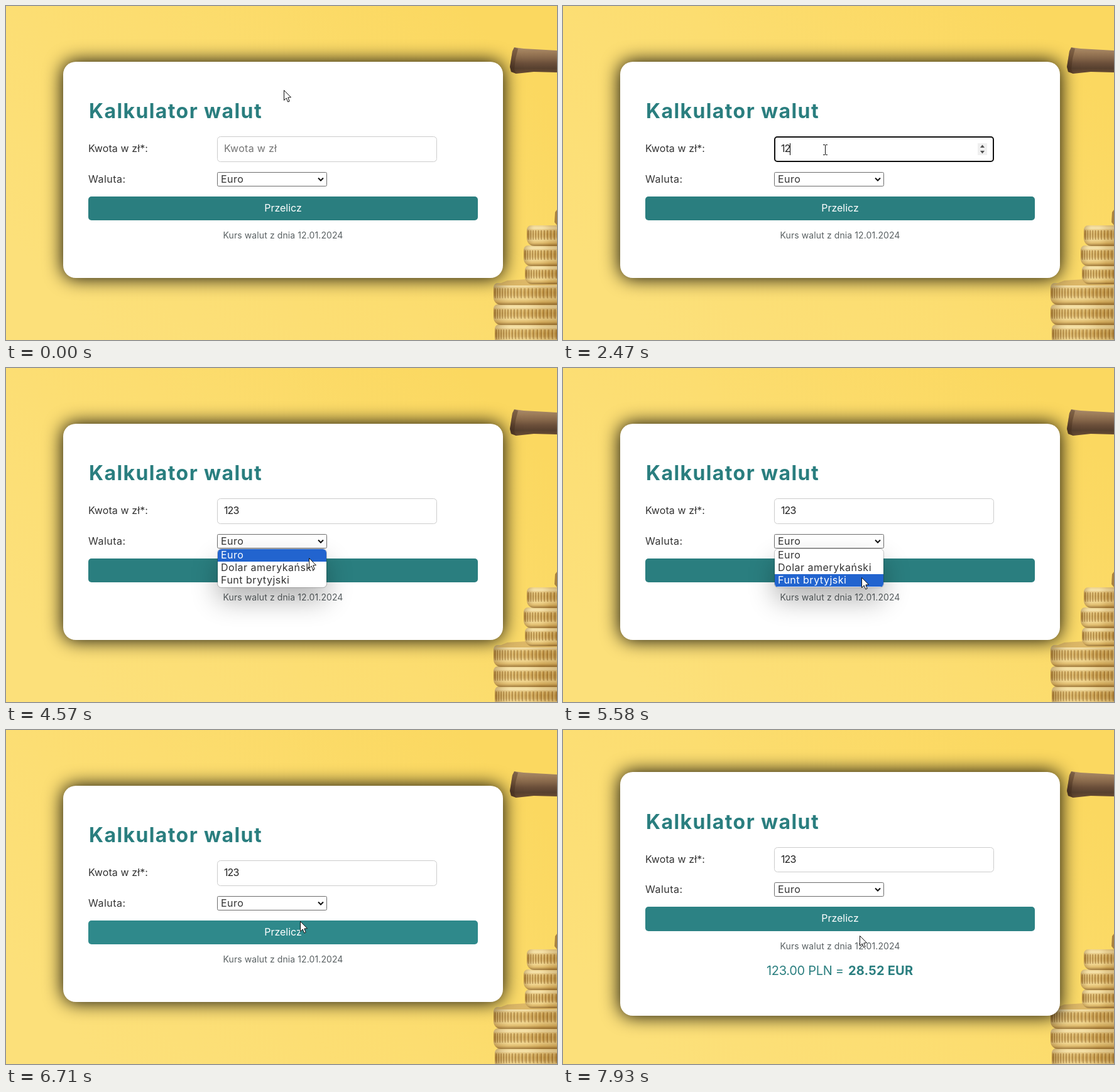
Recreate the animation shown at these times as an HTML page with a canvas. Size 877 px wide and 533 px high, loop 8000 ms.

```html
<!DOCTYPE html>
<html lang="pl">
<head>
<meta charset="utf-8">
<title>Kalkulator walut</title>
<style>
  html, body { margin: 0; width: 100%; height: 100%; overflow: hidden; background: #fcdc6c; }
  canvas { display: block; }
</style>
</head>
<body>
<canvas id="stage" width="877" height="533"></canvas>
<script>
const W = 877, H = 533, LOOP = 8000;
const TEAL = [42, 126, 127], TEAL_HOVER = [60, 162, 165];
const OPTIONS = ["Euro", "Dolar amerykański", "Funt brytyjski"];
const ctx = document.getElementById("stage").getContext("2d");

const rgb = c => `rgb(${c.map(Math.round)})`;
const mix = (a, b, f) => a.map((v, i) => v + (b[i] - v) * f);
const clamp = v => Math.max(0, Math.min(1, v));
const smooth = f => f * f * (3 - 2 * f);
const within = (t, a, b) => t >= a && t < b;

// Pointer moves: start, end, number of steps, target x, target y
const MOVES = [
  [70, 400, 6, 417, 229],
  [2670, 2670, 1, 416, 229],
  [3270, 3680, 7, 498, 276],
  [3750, 3820, 2, 499, 273],
  [4230, 4570, 6, 482, 303],
  [5240, 5640, 7, 475, 336],
  [5840, 6240, 7, 468, 303],
  [6650, 6990, 6, 472, 328]
];
const CLICKS = [[540, 600], [3820, 3960], [6510, 6650], [7650, 7790]];
const KEYS = [2200, 2470, 2940];
const OPEN = 3890, CLOSE = 6580, RESULT = 7790;

function pointerAt(t) {
  let x = 442, y = 134;
  for (const [start, end, n, tx, ty] of MOVES) {
    if (t < start) break;
    const step = n > 1 ? (end - start) / (n - 1) : 1;
    const k = Math.min(n, Math.floor((t - start) / step + 0.01) + 1);
    const f = smooth(k / n);
    x += (tx - x) * f;
    y += (ty - y) * f;
  }
  return { x: Math.round(x), y: Math.round(y) };
}

function caretOn(t) {
  const last = KEYS.filter(k => t >= k).pop();
  if (last) return (t - last) % 1000 < 500;
  return within(t, 540, 1070) || within(t, 1540, 2070);
}

function text(c, s, x, y, font, color, gap = 0, align = "left") {
  c.font = font + " Inter, 'Open Sans', sans-serif";
  c.letterSpacing = gap + "px";
  c.textAlign = align;
  c.fillStyle = color;
  c.fillText(s, x, y);
}

function box(c, x, y, w, h, r, fill, stroke, line = 1) {
  c.beginPath();
  c.roundRect(x, y, w, h, r);
  if (fill) { c.fillStyle = fill; c.fill(); }
  if (stroke) { c.strokeStyle = stroke; c.lineWidth = line; c.stroke(); }
}

function poly(c, pts, fill) {
  c.beginPath();
  pts.forEach(([x, y]) => c.lineTo(x, y));
  c.closePath();
  c.fillStyle = fill;
  c.fill();
}

function gradient(c, x0, y0, x1, y1, colors) {
  const g = c.createLinearGradient(x0, y0, x1, y1);
  colors.forEach((col, i) => g.addColorStop(i / (colors.length - 1), col));
  return g;
}

// One flat coin seen from the side, running off the right edge
function coin(c, x, y, h) {
  c.save();
  box(c, x, y, W - x + 40, h, [7, 0, 0, 12]);
  c.clip();
  c.fillStyle = gradient(c, 0, y, 0, y + h,
    ["#e9cd88", "#f6e3ab", "#d2a959", "#c69a48", "#cda355", "#f0d48c", "#dcb563", "#8f6628"]);
  c.fillRect(x, y, W - x, h);

  // Milled edge, denser where the rim curves away
  for (let px = x + 2, i = 0; px < W; i++) {
    c.fillStyle = "rgba(125,84,28,.5)";
    c.fillRect(px, y + h * 0.24, 1.6, h * 0.46);
    c.fillStyle = "rgba(250,228,165,.55)";
    c.fillRect(px + 1.8, y + h * 0.22, 1.4, h * 0.46);
    px += 3.6 + Math.min(2.4, i * 0.25);
  }

  // Shaded left side, a bright band, then softer light
  c.fillStyle = gradient(c, x, 0, W, 0,
    ["rgba(120,78,20,.35)", "rgba(255,240,190,.15)", "rgba(255,240,190,.1)", "rgba(150,105,40,.15)", "rgba(130,88,30,.25)"]);
  c.fillRect(x, y, W - x, h);
  c.restore();
}

function makeBackdrop() {
  const cv = document.createElement("canvas");
  cv.width = W;
  cv.height = H;
  const c = cv.getContext("2d");
  c.fillStyle = gradient(c, 150, H, 730, 0, ["#fce07a", "#fcdd70", "#fbd860"]);
  c.fillRect(0, 0, W, H);

  // Wooden handle
  const wood = gradient(c, 0, 66, 0, 108, ["#a98b6b", "#9c7b58", "#86674a", "#6b4f3a", "#57402f", "#6a4d34"]);
  poly(c, [[809, 66], [824, 68], [W, 71], [W, 106], [840, 105], [812, 108], [804, 105], [802, 97], [806, 72]], wood);
  poly(c, [[809, 66], [815, 68], [811, 84], [809, 101], [812, 108], [804, 105], [802, 97], [806, 72]], "rgba(70,45,28,.4)");

  // Coin stacks, lowest first
  coin(c, 778, 508, 34);
  coin(c, 776, 476, 33);
  coin(c, 776, 442, 35);
  poly(c, [[778, 446], [798, 438], [830, 436], [W, 436], [W, 446]], "#dcb767");
  coin(c, 826, 414, 30);
  coin(c, 824, 382, 33);
  coin(c, 829, 350, 33);
  poly(c, [[W, 325], [874, 329], [873, 345], [W, 350]], "#a9823f");
  return cv;
}
const backdrop = makeBackdrop();

function drawCard(y, h) {
  ctx.save();
  ctx.shadowColor = "#000";
  ctx.shadowBlur = 30;
  box(ctx, 91, y, 700, h, 20, "#fff");
  ctx.restore();
}

function drawSpinner(y) {
  ctx.fillStyle = "#efefef";
  ctx.fillRect(660, y + 11, 15, 19);
  poly(ctx, [[664, y + 18], [667.5, y + 13.5], [671, y + 18]], "#505050");
  poly(ctx, [[664, y + 23], [667.5, y + 27.5], [671, y + 23]], "#505050");
}

function drawInput(t, y, h, focused, hovered) {
  if (focused) box(ctx, 337, y + 1, 348, h - 2, 4, "#fff", "#101010", 2);
  else box(ctx, 336.5, y + 0.5, 349, h - 1, 5, "#fff", "#ccc");
  const value = "123".slice(0, KEYS.filter(k => t >= k).length);
  if (value) text(ctx, value, 347, y + 25, "16px", "#222", -0.9);
  else text(ctx, "Kwota w zł", 347, y + 25, "16px", "#757575", 0.3);
  if (focused && caretOn(t)) {
    const w = value ? Math.round(ctx.measureText(value).width) : 0;
    ctx.fillStyle = "#000";
    ctx.fillRect(347 + w, y + 11, 1, 19);
  }
  if (focused || hovered) drawSpinner(y);
}

function drawSelect(y) {
  box(ctx, 336.5, y + 0.5, 174, 22, 2, "#fff", "#6c6c6c");
  text(ctx, OPTIONS[0], 342, y + 17, "16px", "#333", 0.5);
  ctx.strokeStyle = "#111";
  ctx.lineWidth = 2;
  ctx.beginPath();
  ctx.moveTo(497, y + 9.5);
  ctx.lineTo(501, y + 13.5);
  ctx.lineTo(505, y + 9.5);
  ctx.stroke();
}

function drawPopup(pointerY) {
  ctx.save();
  ctx.shadowColor = "rgba(0,0,0,.3)";
  ctx.shadowBlur = 42;
  ctx.shadowOffsetY = 20;
  box(ctx, 337, 289, 173, 61, 6, "#fff");
  ctx.restore();
  const active = Math.max(0, Math.min(2, Math.floor((pointerY - 289) / 20)));
  ctx.save();
  ctx.beginPath();
  ctx.roundRect(337, 289, 173, 61, 6);
  ctx.clip();
  ctx.fillStyle = "#2264cf";
  ctx.fillRect(337, 289 + active * 20, 173, 20);
  ctx.restore();
  box(ctx, 336.5, 288.5, 174, 62, 6, null, "rgba(0,0,0,.2)");
  OPTIONS.forEach((s, i) =>
    text(ctx, s, 342, 304 + i * 20, "16px", i === active ? "#fff" : "#333", 0.5));
}

function drawArrow(x, y) {
  ctx.beginPath();
  for (const [dx, dy] of [[0.5, 0.5], [0.5, 16.5], [4.2, 13], [6.7, 19], [9.2, 18], [6.8, 12], [11.5, 11.7]])
    ctx.lineTo(x + dx, y + dy);
  ctx.closePath();
  ctx.fillStyle = "#fff";
  ctx.fill();
  ctx.strokeStyle = "#111";
  ctx.lineWidth = 1;
  ctx.stroke();
}

function drawBeam(x, y) {
  ctx.fillStyle = "#111";
  ctx.fillRect(x, y - 7, 1, 15);
  for (const dy of [-8, 8]) {
    ctx.fillRect(x - 3, y + dy, 3, 1);
    ctx.fillRect(x + 1, y + dy, 3, 1);
  }
}

function draw(t) {
  const p = pointerAt(t);
  const done = t >= RESULT;
  const up = done ? 21 : 0, up2 = done ? 22 : 0;
  const open = within(t, OPEN, CLOSE);
  const overInput = p.x >= 336 && p.x <= 686 && p.y >= 208 && p.y <= 249;
  const hover = clamp((t - 6650) / 200) * (1 - clamp((t - RESULT) / 160));

  ctx.drawImage(backdrop, 0, 0);
  drawCard(89 - up2, done ? 389 : 345);
  text(ctx, "Kalkulator walut", 132, 179 - up, "bold 32px", rgb(TEAL), 1.4);
  text(ctx, "Kwota w zł*:", 131, 233 - up, "16px", "#333", 0.1);
  drawInput(t, 208 - up, done ? 40 : 41, within(t, 540, OPEN), overInput);
  text(ctx, "Waluta:", 131, 282 - up2, "16px", "#333", 0.5);
  drawSelect(265 - up2);
  box(ctx, 131, 304 - up2, 620, done ? 39 : 38, 5, rgb(mix(TEAL, TEAL_HOVER, hover)));
  text(ctx, "Przelicz", 441, 328 - up2, "16px", "#fff", 0, "center");
  text(ctx, "Kurs walut z dnia 12.01.2024", 441, 371 - up, "14px", "#5a6163", 0.1, "center");
  if (done) {
    text(ctx, "123.00 PLN =", 324, 391, "20px", rgb(TEAL), -0.3);
    text(ctx, "28.52 EUR", 454, 391, "bold 20px", rgb(TEAL), 0.2);
  }
  if (open) drawPopup(p.y);

  if (CLICKS.some(([a, b]) => within(t, a, b))) {
    ctx.fillStyle = "rgba(255,240,0,.5)";
    ctx.beginPath();
    ctx.arc(p.x, p.y, 12, 0, Math.PI * 2);
    ctx.fill();
  }
  if (overInput) drawBeam(p.x, p.y);
  else drawArrow(p.x, p.y);
}

const begin = performance.now();
function tick() {
  draw((performance.now() - begin) % LOOP);
  requestAnimationFrame(tick);
}
tick();
</script>
</body>
</html>
```
